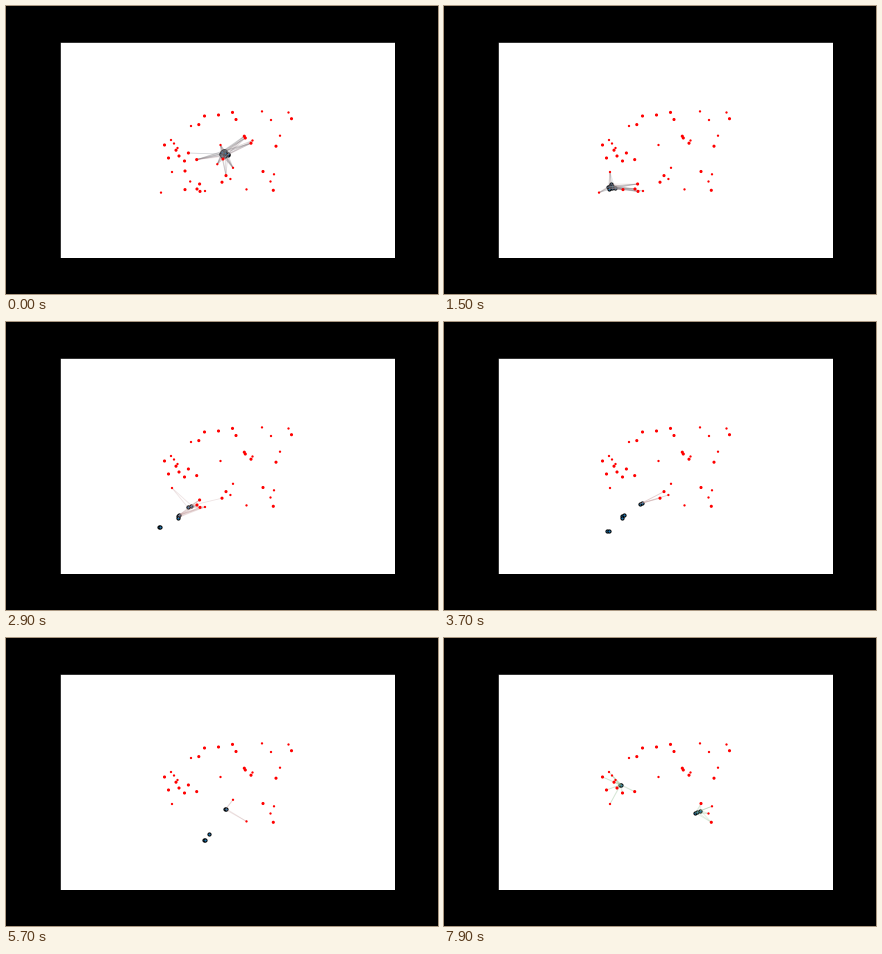
Animation, 432 px wide and 288 px high, one loop 8000 ms. Source, as a matplotlib script:

```python
import numpy as np
import matplotlib.pyplot as plt
from matplotlib.animation import FuncAnimation
from matplotlib.collections import LineCollection
from matplotlib.colors import to_rgba

W, H, DPI = 432, 288, 72
FRAMES, STEP = 80, 100
REACH = np.array([33, 22])  # half axes of the sensing ellipse
BITE = 5.2                  # food closer than this is eaten
SPREAD = 4                  # radius of the young swarm

SMALL = [(165, 134), (168, 137.5), (171.5, 142), (166, 166), (214.5, 139),
         (268, 168.3), (264.5, 175.5), (274, 129.7), (246.5, 134.5),
         (185, 120), (256, 105.4), (282.5, 106.5), (265, 114),
         (211.3, 158.2), (184.2, 175.5), (155, 186.6), (199, 185),
         (224.4, 173), (227, 161.8), (240.5, 183.4)]
LARGE = [(170, 144.2), (162.5, 152), (257, 165.5), (230, 113.5),
         (198.5, 110), (285.5, 112.7), (158.5, 139), (173, 150),
         (178.5, 155), (190.7, 153.6), (267.3, 184.3), (270, 140.2),
         (238.3, 130.2), (239.3, 132), (245, 137.2), (226.5, 106.4),
         (212.5, 109), (192.8, 118.6), (217, 153), (179, 165),
         (179, 183.6), (191, 183), (194, 185.4), (193.6, 178),
         (216, 176.2), (220, 169.6), (182.4, 147)]
food = np.array(SMALL + LARGE)
area = np.repeat([2.3, 3.1], [len(SMALL), len(LARGE)]) ** 2

# Key points (step, x, y): one shared start, then three ways
START = [(0, 218, 147), (7, 195.5, 161.5), (15, 167, 180)]
PATHS = {
    "low": [(23, 146.5, 193), (29, 153.5, 205), (37, 164, 209),
            (46, 180.7, 206), (68, 216.5, 198), (79, 252.3, 174.4)],
    "mid": [(22, 160, 196), (29, 172, 194), (46, 185.5, 194.5),
            (68, 220.5, 196.5), (79, 256.5, 172.5)],
    "high": [(19, 166, 182), (29, 183.5, 184.3), (36, 197, 181),
             (46, 198.5, 184.8), (56, 219, 172.5), (62, 222.7, 164.2),
             (68, 211.5, 160.5), (74, 193, 146), (79, 176.5, 146.8)],
}
TINTS = ["slategray", "gray", "rosybrown"]


class Agent:
    def __init__(self, i, group, gap=(0, 0), end=FRAMES):
        self.path = np.array(START + PATHS[group]).T
        self.group, self.gap, self.end = group, np.array(gap), end
        angle, radius = 2.4 * i, SPREAD * np.sqrt(0.618 * i % 1)
        self.offset = radius * np.array([np.cos(angle), np.sin(angle)])
        self.tint = TINTS[i % len(TINTS)]

    def pos(self, t):
        step, x, y = self.path
        loose = np.interp(t, [15, 29], [1, 0])
        close = np.interp(t, [29, 46], [1, 0.3]) if self.group == "high" else 1
        centre = np.array([np.interp(t, step, x), np.interp(t, step, y)])
        return centre + loose * self.offset + close * self.gap

    def color(self, t):
        if t < 29:
            return to_rgba(self.tint, 0.18)
        return to_rgba("rosybrown" if t < 73 else "darkseagreen", 0.25)


team = [("low", (-0.9, 0.4)), ("low", (0.9, -0.4)),
        ("mid",), ("mid", (1.5, -1.4), 38), ("mid", (0, 1.6), 38),
        ("high", (-1.9, 0.8)), ("high", (1.9, -0.8))]
team += [("high", (0, 0), end) for end in np.linspace(2, 20, 8)]
agents = [Agent(i, *args) for i, args in enumerate(team)]


def swarm_at(t):
    alive = [a for a in agents if a.end > t]
    return alive, np.array([a.pos(t) for a in alive])


# Last step at which each piece of food is still there
last = np.full(len(food), FRAMES)
for t in range(FRAMES):
    gaps = food[:, None] - swarm_at(t)[1]
    bitten = np.hypot(*gaps.T).min(axis=0) < BITE
    last[bitten] = np.minimum(last[bitten], t)

fig = plt.figure(figsize=(W / DPI, H / DPI), dpi=DPI, facecolor="black")
ax = fig.add_axes([0.125, 0.125, 0.775, 0.75])
ax.set(xlim=(0.125 * W, 0.9 * W), ylim=(0.875 * H, 0.125 * H),
       xticks=[], yticks=[])

bodies = ax.scatter([], [], s=10, c="tab:blue", edgecolors="black",
                    linewidths=1, zorder=2)
links = ax.add_collection(LineCollection([], linewidths=0.8, zorder=3))
dots = ax.scatter([], [], c="red", linewidths=0, zorder=4)


def update(t):
    here = last >= t
    left = food[here]
    alive, spots = swarm_at(t)
    lines, colors = [], []
    for a, p in zip(alive, spots):
        near = left[np.hypot(*((left - p) / REACH).T) < 1]
        lines += [(p, q) for q in near]
        colors += [a.color(t)] * len(near)
    bodies.set_offsets(spots)
    links.set_segments(lines)
    links.set_color(colors)
    dots.set_offsets(left)
    dots.set_sizes(area[here])
    return bodies, links, dots


anim = FuncAnimation(fig, update, frames=FRAMES, interval=STEP,
                     repeat=True, repeat_delay=0)
plt.show()
```
